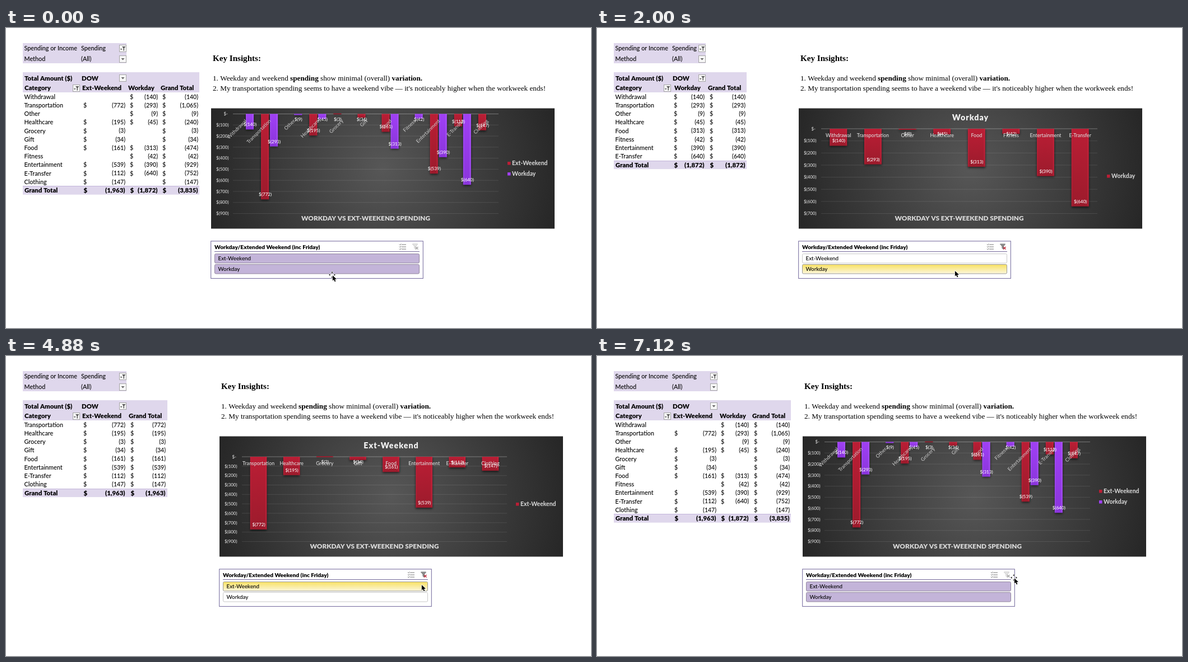
Animation, 1044 px wide and 536 px high, one loop 7.2 s. Source, as an HTML page with a canvas:

```html
<!DOCTYPE html>
<html lang="en">
<head>
<meta charset="utf-8">
<title>Workday vs weekend spending</title>
<style>
html, body { margin: 0; height: 100%; overflow: hidden; background: #fff; }
canvas { display: block; }
</style>
</head>
<body>
<canvas id="stage" width="1044" height="536"></canvas>
<script>
const g = document.getElementById('stage').getContext('2d');
const SANS = 'Lato, "Open Sans", sans-serif';
const SERIF = '"Liberation Serif", "Noto Serif", serif';
const LOOP = 7200;
const LILAC = '#dfd7ec', PALE = '#dcdcdc';
const RED = ['#d22a45', '#bb1e35', '#9c1b2c'];
const PURPLE = ['#b765ff', '#a040f5', '#8a35dc'];

// category, extended weekend, workday
const DATA = [
  ['Withdrawal', 0, 140], ['Transportation', 772, 293], ['Other', 0, 9],
  ['Healthcare', 195, 45], ['Grocery', 3, 0], ['Gift', 34, 0],
  ['Food', 161, 313], ['Fitness', 0, 42], ['Entertainment', 539, 390],
  ['E-Transfer', 112, 640], ['Clothing', 147, 0]
];
const ext = r => r[1], work = r => r[2], both = r => r[1] + r[2];

// column: title, title x, dollar x, right edge, value
const wide = d => ({
  ox: 366 + d, right: 345 + d, button: 202, filtered: false, rows: DATA,
  cols: [['Ext-Weekend', 136, 138, 213, ext], ['Workday', 218 + d, 221, 271, work],
    ['Grand Total', 276 + d, 279 + d, 343 + d, both]]
});
const LAYOUT = {
  start: wide(0),
  end: wide(1),
  work: {
    ox: 360, right: 267, button: 181, filtered: true, rows: DATA.filter(work),
    cols: [['Workday', 138, 137, 192, work], ['Grand Total', 198, 201, 265, work]]
  },
  ext: {
    ox: 381, right: 288, button: 202, filtered: true, rows: DATA.filter(ext),
    cols: [['Ext-Weekend', 136, 138, 213, ext], ['Grand Total', 219, 222, 285, ext]]
  }
};
const EXT = { name: 'Ext-Weekend', value: ext, color: RED };
const WORK = { name: 'Workday', value: work, color: PURPLE };
const CHART = {
  both: { rows: DATA, series: [EXT, WORK], left: 39, right: 513, top: 153.5, max: 900, legend: 537 },
  work: { rows: DATA.filter(work), series: [{ ...WORK, color: RED }], left: 40, right: 533, top: 180, max: 700, legend: 558 },
  ext: { rows: DATA.filter(ext), series: [EXT], left: 40, right: 513, top: 180, max: 900, legend: 537 }
};

// time, value
const layouts = [[0, 'start'], [1040, 'work'], [3440, 'ext'], [5920, 'end']];
const charts = [[0, 'both'], [1400, 'work'], [3760, 'ext'], [6500, 'both']];
const picks = [[0, 'both'], [500, 'work'], [2960, 'ext'], [5560, 'both']];
const pointers = [[0, 'move'], [180, 'arrow'], [5920, 'plus'], [6800, 'move']];
const path = [[0, 582, 441], [80, 582, 441], [400, 638, 433], [2500, 638, 433], [2880, 637, 412],
  [4200, 637, 412], [4800, 741, 408], [5000, 741, 408], [5360, 746, 390], [6600, 746, 390], [6900, 744, 396]];

const at = (list, t) => list.filter(k => k[0] <= t).pop()[1];

function pointAt(t) {
  const i = path.findIndex(k => k[0] > t);
  if (i < 0) return path[path.length - 1].slice(1);
  const [a, ax, ay] = path[i - 1], [b, bx, by] = path[i];
  const u = (t - a) / (b - a), e = u * u * (3 - 2 * u);
  return [ax + (bx - ax) * e, ay + (by - ay) * e];
}

// y is the middle of the capitals
function text(s, x, y, size, { color = '#000', weight = 500, align = 'left', family = SANS, gap = 0 } = {}) {
  g.font = `${weight} ${size}px ${family}`;
  g.letterSpacing = gap + 'px';
  g.textAlign = align;
  g.fillStyle = color;
  g.fillText(s, x, y + size * .35);
  return g.measureText(s).width;
}
const bold = (s, x, y, size = 11.4, o = {}) => text(s, x, y, size, { weight: 900, ...o });

function rect(x, y, w, h, fill) {
  g.fillStyle = fill;
  g.fillRect(x, y, w, h);
}
function line(x1, y1, x2, y2, color, width = 1) {
  g.strokeStyle = color;
  g.lineWidth = width;
  g.beginPath();
  g.moveTo(x1, y1);
  g.lineTo(x2, y2);
  g.stroke();
}
function shape(points, fill, stroke, width = 1) {
  g.beginPath();
  points.forEach(p => g.lineTo(...p));
  g.closePath();
  if (stroke) { g.strokeStyle = stroke; g.lineWidth = width; g.stroke(); }
  if (fill) { g.fillStyle = fill; g.fill(); }
}

function dropdown(x, y, filtered) {
  rect(x, y, 13, 13, '#f7f7f7');
  g.strokeStyle = '#a6a6a6';
  g.lineWidth = 1;
  g.strokeRect(x + .5, y + .5, 12, 12);
  if (!filtered) return shape([[x + 3.5, y + 5], [x + 9.5, y + 5], [x + 6.5, y + 8.5]], '#666');
  shape([[x + 5, y + 3], [x + 11.5, y + 3], [x + 9, y + 6], [x + 9, y + 10.5], [x + 7.5, y + 10.5], [x + 7.5, y + 6]], '#555');
  shape([[x + 1.8, y + 7], [x + 5.6, y + 7], [x + 3.7, y + 9.2]], '#555');
}

function drawTable({ right, button, filtered, rows, cols }) {
  rect(30, 27, button - 17, 36, LILAC);
  text('Spending or Income', 32.5, 36.5, 10.8);
  text('Spending', 134, 36.5, 10.8);
  text('Method', 32.5, 55.5, 10.8);
  text('(All)', 134, 55.5, 10.8);
  dropdown(button, 30, true);
  dropdown(button, 49, false);

  rect(30, 79, right - 30, 36, LILAC);
  bold('Total Amount ($)', 33, 90);
  bold('DOW', 135, 90);
  dropdown(button, 83, filtered);
  bold('Category', 33, 107.5);
  dropdown(119, 101, true);

  const money = v => `(${v.toLocaleString('en-US')})`;
  const totalY = 123 + rows.length * 15.2;
  rect(30, totalY - 7.5, right - 30, 15, LILAC);
  line(30, Math.round(totalY - 8) + .5, right, Math.round(totalY - 8) + .5, '#c3b5da');
  bold('Grand Total', 33, totalY);
  rows.forEach((r, i) => text(r[0], 32.5, 123 + i * 15.2, 10.8));
  for (const [title, x, dollar, edge, value] of cols) {
    bold(title, x, 107.5);
    rows.forEach((r, i) => {
      const y = 123 + i * 15.2;
      if (!value(r)) return;
      text('$', dollar, y, 10.8);
      text(money(value(r)), edge, y, 10.5, { align: 'right' });
    });
    bold('$', dollar + .5, totalY);
    bold(money(rows.reduce((s, r) => s + value(r), 0)), edge - .5, totalY, 11.4, { align: 'right' });
  }
}

function drawInsights(ox) {
  const serif = { family: SERIF, weight: 400 }, strong = { family: SERIF, weight: 700 };
  text('Key Insights:', ox + 3, 54, 15.1, strong);
  let x = ox + 3;
  x += text('1. Weekday and weekend ', x, 89.5, 13.22, serif);
  x += text('spending', x, 89.5, 13.22, strong);
  x += text(' show minimal (overall) ', x, 89.5, 13.22, serif);
  text('variation.', x, 89.5, 13.22, strong);
  text("2. My transportation spending seems to have a weekend vibe — it's noticeably higher when the workweek ends!",
    ox + 3, 107, 13.22, serif);
}

function drawBar(x, y, w, h, [light, mid, dark]) {
  const fill = g.createLinearGradient(0, y, 0, y + h);
  fill.addColorStop(0, mid);
  fill.addColorStop(1, dark);
  g.save();
  g.shadowColor = 'rgba(0,0,0,.6)';
  g.shadowBlur = 4;
  g.shadowOffsetY = 2;
  rect(x, y, w, h, fill);
  g.restore();
  g.globalAlpha = .4;
  rect(x, y, 1.5, h, light);
  rect(x + w - 2.5, y, 2.5, h, light);
  g.globalAlpha = 1;
  rect(x, y + h - 1.5, w, 1.5, dark);
}

function drawChart({ rows, series, left, right, top, max, legend }, ox) {
  const single = series.length === 1;
  const W = 613, H = 215, bottom = 331.5;
  const cx = ox + W / 2, cy = 143.5 + H / 2;
  const back = g.createRadialGradient(cx, cy, 0, cx, cy, Math.hypot(W, H) / 2);
  back.addColorStop(0, '#575757');
  back.addColorStop(1, '#262626');
  rect(ox, 143.5, W, H, back);

  const x0 = ox + left, x1 = ox + right, step = (x1 - x0) / rows.length;
  const unit = (bottom - top) / max;
  for (let v = 0; v <= max; v += 100) {
    const y = top + v * unit;
    line(x0, y, x1, y, v ? 'rgba(255,255,255,.1)' : 'rgba(255,255,255,.32)');
    text(v ? `$(${v})` : '$-', ox + (v ? 31.5 : 30), y, 7.9, { color: PALE, align: 'right' });
  }

  const barW = single ? step * .5 : 14;
  const bars = [];
  series.forEach((s, k) => rows.forEach((r, i) => {
    const v = s.value(r), mid = x0 + (i + .5) * step + (single ? 0 : k * 16 - 7.5);
    if (v) bars.push({ v, mid, h: v * unit, color: s.color });
  }));
  bars.forEach(b => drawBar(b.mid - barW / 2, top, barW, b.h, b.color));

  rows.forEach((r, i) => {
    const mid = x0 + (i + .5) * step;
    if (single) return text(r[0], mid, top + 11.5, 8.9, { color: PALE, align: 'center' });
    g.save();
    g.translate(mid + 1.5, top + 11);
    g.rotate(-Math.PI / 4);
    text(r[0], 0, 0, 8.9, { color: '#cfcfcf', align: 'right', weight: 400 });
    g.restore();
  });
  bars.forEach(b => text(`$(${b.v})`, b.mid + .5, Math.max(top + 9.5, top + b.h - 8.7), 8.1, { color: '#fff', align: 'center' }));

  bold('WORKDAY VS EXT-WEEKEND SPENDING', (x0 + x1) / 2, 340, 11.8, { color: '#d9d9d9', align: 'center' });
  if (single) bold(series[0].name, ox + 306.5, 160, 14.2, { color: '#f2f2f2', align: 'center', gap: 1 });
  series.forEach((s, k) => {
    const y = single ? 264.5 : 241.5 + k * 19;
    rect(ox + legend - 8, y - 2.5, 5.5, 5.5, s.color[1]);
    text(s.name, ox + legend, y, 10.5, { color: PALE, weight: 700 });
  });
}

function drawSlicer(ox, pick, active) {
  rect(ox - 1, 380, 380, 68, '#fff');
  g.strokeStyle = '#6f6499';
  g.lineWidth = 1;
  g.strokeRect(ox - .3, 380.8, 378.6, 66.6);
  bold('Workday/Extended Weekend (inc Friday)', ox + 6, 391, 10.2);
  line(ox + 6, 399.5, ox + 372, 399.5, '#75699b');

  for (let i = 0; i < 3; i++) {
    const y = 387 + i * 4;
    line(ox + 340, y, ox + 348, y, '#777');
    line(ox + 336, y - .5, ox + 337.5, y + 1, '#777');
    line(ox + 337.5, y + 1, ox + 339, y - 1.5, '#777');
  }
  const ink = active ? '#666' : '#b4b4b4', cross = active ? '#c23040' : '#aaa';
  shape([[ox + 359.5, 386], [ox + 368.5, 386], [ox + 365.5, 390], [ox + 365.5, 395], [ox + 363, 393.5], [ox + 363, 390]],
    active ? '#8a8a8a' : '#e2e2e2', ink);
  line(ox + 365, 391, ox + 369.5, 395.5, cross, 1.4);
  line(ox + 369.5, 391, ox + 365, 395.5, cross, 1.4);

  [['Ext-Weekend', 'ext', 403.5], ['Workday', 'work', 422.5]].forEach(([name, key, y]) => {
    let fill = '#fff', edge = '#c8c8c8';
    if (pick === 'both') [fill, edge] = ['#c3b4d9', '#93879f'];
    if (pick === key) {
      fill = g.createLinearGradient(0, y, 0, y + 17);
      fill.addColorStop(0, '#f8e162');
      fill.addColorStop(1, '#fcf7e0');
      edge = '#999';
    }
    g.beginPath();
    g.roundRect(ox + 6.5, y, 365, 16.5, 2);
    g.fillStyle = fill;
    g.fill();
    g.strokeStyle = edge;
    g.lineWidth = 1;
    g.stroke();
    text(name, ox + 12.5, y + 8.5, 9.8);
  });
}

function drawPointer(kind, x, y) {
  g.save();
  g.translate(x, y);
  g.lineJoin = 'round';
  if (kind === 'plus') {
    const a = 1.5, b = 5;
    shape([[-a, -b], [a, -b], [a, -a], [b, -a], [b, a], [a, a], [a, b], [-a, b], [-a, a], [-b, a], [-b, -a], [-a, -a]],
      '#fff', '#222', 2);
  } else {
    if (kind === 'move') {
      for (let i = 0; i < 4; i++) {
        shape([[-1.8, -3.5], [1.8, -3.5], [0, -6]], '#111', '#fff', 1.2);
        g.rotate(Math.PI / 2);
      }
    }
    g.scale(.88, .88);
    shape([[1, 1], [1, 12], [3.5, 9.8], [5.3, 14], [7.3, 13.1], [5.5, 9], [9, 8.8]], '#000', '#fff', 1.6);
  }
  g.restore();
}

function draw(now) {
  const t = now % LOOP;
  const layout = LAYOUT[at(layouts, t)];
  rect(0, 0, 1044, 536, '#fff');
  drawTable(layout);
  drawInsights(layout.ox);
  drawChart(CHART[at(charts, t)], layout.ox);
  drawSlicer(layout.ox, at(picks, t), layout.filtered);
  drawPointer(at(pointers, t), ...pointAt(t));
}

const begin = performance.now();
function tick() {
  draw(performance.now() - begin);
  requestAnimationFrame(tick);
}
tick();
</script>
</body>
</html>
```
